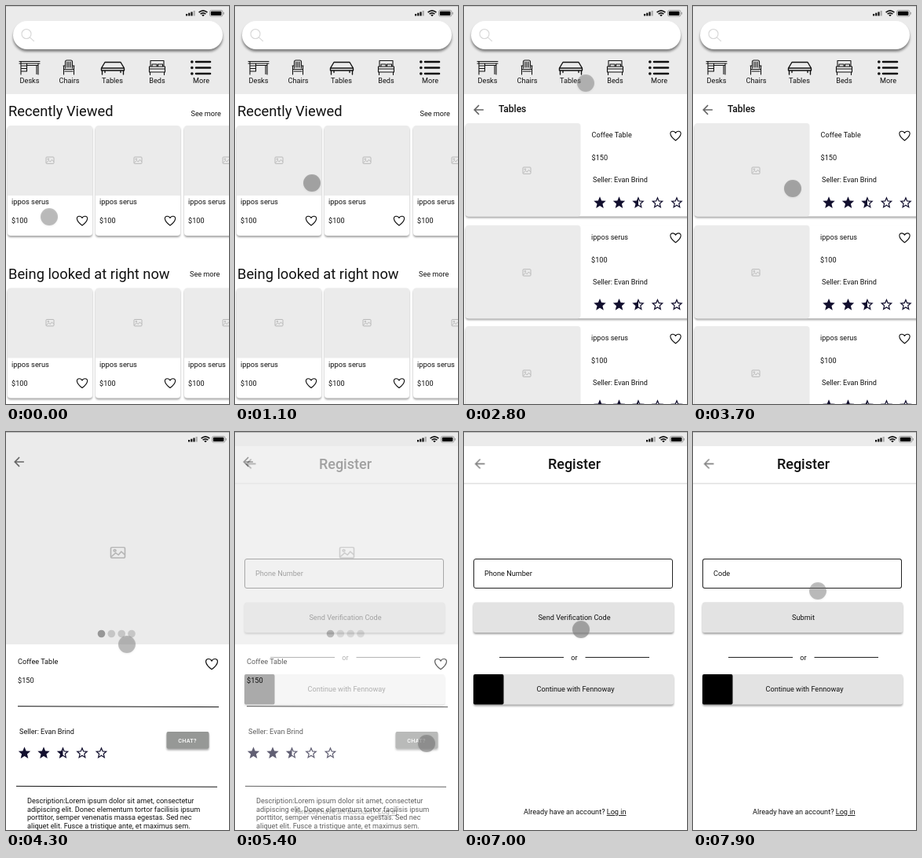
These frames come from a looping animation (284 px wide and 506 px high, 8000 ms). An HTML page:

```html
<!DOCTYPE html>
<html lang="en">
<head>
<meta charset="utf-8">
<title>Furniture app prototype</title>
<style>
html, body { margin: 0; width: 100%; height: 100%; overflow: hidden; background: #fff; }
svg { display: block; width: 284px; height: 506px; }
text { font: 9.15px Roboto, sans-serif; fill: #111; }
.h { font-size: 18.3px; }
.med { font-weight: 500; }
.mid { text-anchor: middle; }
.nav { font-size: 8.3px; }
.ln { fill: none; stroke: #111; stroke-width: 1.1; stroke-linejoin: round; stroke-linecap: round; }
.soft { filter: drop-shadow(0 2px 1.2px rgba(0,0,0,.35)); }
.deep { filter: drop-shadow(0 3px 1.5px rgba(0,0,0,.45)); }
.star { fill: #120f2e; fill-rule: evenodd; }

.layer, #arrow, #press, #cursor { animation: 8s steps(3) infinite; }
#bar { animation-name: bar; }
#tables { animation-name: tables; }
#detail { animation-name: detail; }
#register { animation-name: register; }
#code { animation-name: code; }
@keyframes bar { 0%, 15% { opacity: 0 } 18.75%, 100% { opacity: 1 } }
@keyframes tables { 0%, 31.25% { opacity: 0 } 35%, 100% { opacity: 1 } }
@keyframes detail { 0%, 47.5% { opacity: 0 } 51.25%, 100% { opacity: 1 } }
@keyframes register { 0%, 66.25% { opacity: 0 } 70%, 100% { opacity: 1 } }
@keyframes code { 0%, 91.25% { opacity: 0 } 95%, 100% { opacity: 1 } }

#arrow { animation-name: arrow; animation-timing-function: steps(9); }
@keyframes arrow { 0%, 76.25% { opacity: 1 } 87.5%, 100% { opacity: .62 } }

#press { animation-name: press; animation-timing-function: step-end; }
@keyframes press {
  0%, 23.75%, 35%, 50%, 70%, 88.75%, 95%, 100% { opacity: 0 }
  13.75%, 30%, 43.75%, 66.25%, 77.5%, 91.25% { opacity: .24 }
}

/* the pointer advances ten times a second */
#cursor { animation-name: cursor; }
@keyframes cursor {
  0% { transform: translate(55px, 268px); animation-timing-function: steps(5) }
  6.25% { transform: translate(98px, 225px) }
  18.75% { transform: translate(98px, 225px); animation-timing-function: steps(4) }
  23.75% { transform: translate(137px, 214px) }
  27.5% { transform: translate(165px, 150px); animation-timing-function: steps(2) }
  30% { transform: translate(155px, 98px) }
  36.25% { transform: translate(155px, 98px); animation-timing-function: steps(5) }
  42.5% { transform: translate(127px, 232px) }
  48.75% { transform: translate(127px, 232px); animation-timing-function: steps(4) }
  53.75% { transform: translate(154px, 270px); animation-timing-function: steps(2) }
  56.25% { transform: translate(92px, 322px); animation-timing-function: step-end }
  57.5% { transform: translate(83px, 362px); animation-timing-function: step-end }
  58.75% { transform: translate(130px, 402px); animation-timing-function: step-end }
  60% { transform: translate(200px, 409px); animation-timing-function: step-end }
  61.25% { transform: translate(244px, 396px) }
  70% { transform: translate(244px, 396px) }
  73.75% { transform: translate(200px, 340px); animation-timing-function: steps(2) }
  76.25% { transform: translate(149px, 251px) }
  96.25% { transform: translate(149px, 251px); animation-timing-function: steps(2) }
  98.75%, 100% { transform: translate(159px, 202px) }
}
</style>
</head>
<body>
<svg viewBox="0 0 284 506">
<defs>
  <g id="status">
    <path d="M229 12.5v-2.5h2.2v2.5zM232.2 12.5v-3.8h2.2v3.8zM235.4 12.5v-5h2.2v5z" fill="#111"/>
    <path d="M238.6 12.5v-6.5h2.2v6.5z" fill="#aaa"/>
    <path d="M245.6 8.2q5.4-4.6 10.8 0M247.6 10.2q3.4-2.8 6.8 0" fill="none" stroke="#111" stroke-width="1.6"/>
    <path d="M251 13.2l-1.8-1.8q1.8-1.4 3.6 0z" fill="#111"/>
    <rect x="259.5" y="5.5" width="16.5" height="7.6" rx="2" fill="none" stroke="#888" stroke-width=".8"/>
    <rect x="260.8" y="6.7" width="13.6" height="5.2" rx="1" fill="#000"/>
    <path d="M277.2 8v2.6" stroke="#888"/>
  </g>
  <path id="heart" class="ln" d="M0 6C-9-.6-7.4-5.8-3.7-5.8-1.6-5.8-.4-4.4 0-3.4.4-4.4 1.6-5.8 3.7-5.8 7.4-5.8 9-.6 0 6Z"/>
  <g id="pic" fill="none" stroke="#b4b4b4" stroke-width=".9">
    <rect x="-5" y="-4" width="10" height="8.4" rx="1"/>
    <path d="M-4.6 3.4l3-3 2 1.6 2-2.6 2.4 2.4"/><circle cx="-2.2" cy="-1.4" r=".8"/>
  </g>
  <path id="back" d="M8-1h-12.2L1.4-6.6 0-8l-8 8 8 8 1.4-1.4L-4.2 1H8z" transform="scale(.8)"/>
  <path id="full" d="M12 17.3L18.2 21l-1.7-7L22 9.2l-7.2-.6L12 2 9.2 8.6 2 9.2 7.5 14 5.8 21z"/>
  <path id="half" d="M12 17.3L18.2 21l-1.7-7L22 9.2l-7.2-.6L12 2 9.2 8.6 2 9.2 7.5 14 5.8 21zM12 15.4V6.1l1.7 4 4.4.4-3.3 2.9 1 4.3z"/>
  <path id="open" d="M12 17.3L18.2 21l-1.7-7L22 9.2l-7.2-.6L12 2 9.2 8.6 2 9.2 7.5 14 5.8 21zM12 15.4l-3.8 2.3 1-4.3-3.3-2.9 4.4-.4L12 6.1l1.7 4 4.4.4-3.3 2.9 1 4.3z"/>
  <g id="stars" class="star" transform="scale(.77) translate(-12 -12)">
    <use href="#full"/><use href="#full" x="31.8"/><use href="#half" x="63.6"/>
    <use href="#open" x="95.4"/><use href="#open" x="127.2"/>
  </g>
  <g id="card">
    <rect x="2" y="152" width="108" height="140" rx="4" fill="#fff" class="soft"/>
    <path d="M2 241v-85q0-4 4-4h100q4 0 4 4v85z" fill="#ebebeb"/>
    <use href="#pic" x="56" y="196"/>
    <text x="7" y="252.3" style="font-size:9.3px">ippos serus</text>
    <text x="7" y="276">$100</text>
    <use href="#heart" x="97" y="273"/>
  </g>
  <g id="cards"><use href="#card"/><use href="#card" x="112"/><use href="#card" x="225"/></g>
  <g id="row">
    <rect x="2" y="149" width="290" height="118.5" rx="4" fill="#fff" class="soft"/>
    <rect x="2" y="149" width="146.5" height="118.5" rx="4" fill="#ebebeb"/>
    <use href="#pic" x="80" y="209"/>
    <use href="#heart" x="269.5" y="165"/>
    <text x="164" y="224">Seller: Evan Brind</text>
    <use href="#stars" x="173" y="250"/>
  </g>
  <g id="other"><use href="#row"/><text x="162" y="167">ippos serus</text><text x="162" y="196">$100</text></g>
  <g id="head">
    <rect width="284" height="112" fill="#ebebeb"/>
    <path d="M0 .5h284" stroke="#ccc"/>
    <use href="#status"/>
    <rect x="9" y="19" width="267" height="36" rx="18" fill="#fff" class="deep"/>
    <g fill="none" stroke="#d6d6d6" stroke-width="1.1"><circle cx="26" cy="35.5" r="6"/><path d="M30.4 39.8l5.4 5"/></g>
    <g class="ln">
      <path d="M17 70.5h26M17 73h26M19 70.5v16.5M41 73v14M26.5 73v10h-7M20 76h6M20 79.5h6M26.5 75.5h14M39 75.5v11" />
      <path d="M75.5 79v-8q0-2 2-2h5q2 0 2 2v8M77.8 71v7M80 71v7M82.2 71v7M73 76h2.5M84.5 76h2.5M73.5 76v11M86.5 76v11M73.5 80.5h13M75 83h10"/>
      <path d="M126 71.5h20l4.5 7.5h-29zM121.5 79v3h29v-3M122.5 82v5M149.5 82v5M126 82v2.5M146 82v2.5" stroke-width="1.4"/>
      <path d="M184 77v-7.5h17v7.5M186 77v-3h6v3M193.500 77v-3h6v3M182.500 77h20v7h-20zM182.500 80h20M183.500 84v3.500M201.500 84v3.500"/>
      <path d="M242 71h18M242 78.500h18M242 86h18" stroke-width="2.600"/>
      <path d="M236.800 71h.1M236.800 78.500h.1M236.800 86h.1" stroke-width="3.600"/>
    </g>
    <g class="mid">
      <text x="30" y="98">Desks</text><text x="80.500" y="98">Chairs</text><text x="135.500" y="98">Tables</text>
      <text x="192.500" y="98">Beds</text><text x="248.500" y="98">More</text>
    </g>
  </g>
  <g id="arm"><path d="M-4.600-3.600L-2-8Q0-10 2-8L4-4.800M4.800-8L4.100-4.600.7-5.300"/></g>
  <rect id="btn" x="12" width="255" height="38.500" rx="3" fill="#e3e3e3"/>
  <rect id="field" x="12.500" y="161.500" width="253" height="37" rx="2.500" fill="#fff" stroke="#222"/>
</defs>

<g id="home">
  <rect width="284" height="506" fill="#fff"/>
  <use href="#head"/>
  <text class="h" x="3" y="140">Recently Viewed</text><text x="235.500" y="140">See more</text>
  <use href="#cards"/>
  <text class="h" x="3" y="347">Being looked at right now</text><text x="234" y="344">See more</text>
  <use href="#cards" y="206.500"/>
</g>

<g id="bar" class="layer">
  <rect y="466" width="284" height="40" fill="#ebebeb"/>
  <g class="ln" stroke-width="1.300">
    <path d="M15 482l10.500-9 10.500 9M17.500 480v13h5v-7h6v7h5v-13"/>
    <use href="#heart" transform="translate(103 483) scale(1.600)"/>
    <path d="M175 473h12q2 0 2 2v8q0 2-2 2h-8l-4 4v-4q-2 0-2-2v-8q0-2 2-2z"/>
    <path d="M189 476.500h2.500q2 0 2 2v8q0 2-2 2v4l-4-4h-7q-2 0-2-2"/>
    <circle cx="252" cy="483" r="10"/><circle cx="252" cy="480" r="3.800"/><path d="M245 489.500q2-4.500 7-4.500t7 4.500"/>
  </g>
  <g class="mid">
    <text class="nav" x="25" y="503.600">Home</text><text class="nav" x="103.500" y="503.600">Favourites</text>
    <text class="nav" x="183" y="503.600">Chat</text><text class="nav" x="252.500" y="503.600">Profile</text>
  </g>
  <g fill="#c6c6c6" class="soft"><circle cx="263" cy="367" r="18.500"/><circle cx="263" cy="427" r="18.500"/></g>
  <g class="ln">
    <g transform="translate(263 367)" stroke-width="1.400">
      <use href="#arm"/><use href="#arm" transform="rotate(120)"/><use href="#arm" transform="rotate(240)"/>
    </g>
    <path d="M255 421h3.500l2-3h5.500l2 3h3.500q1.500 0 1.500 1.500v10q0 1.500-1.500 1.500h-16.500q-1.500 0-1.500-1.500v-10q0-1.500 1.500-1.500z"/>
    <circle cx="263.200" cy="427" r="4"/>
  </g>
  <text x="210.500" y="369.500">Recycle</text><text x="210.500" y="429.500">Upload</text>
</g>

<g id="tables" class="layer">
  <rect width="284" height="506" fill="#fff"/>
  <use href="#head"/>
  <use href="#back" x="18.500" y="132" fill="#666"/>
  <text class="med" x="44" y="135" style="font-size:12px">Tables</text>
  <use href="#row"/><text x="162.500" y="167">Coffee Table</text><text x="162.500" y="196">$150</text>
  <use href="#other" y="129.700"/><use href="#other" y="258"/>
</g>

<g id="detail" class="layer">
  <rect width="284" height="506" fill="#fff"/>
  <rect width="284" height="270" fill="#ebebeb"/>
  <path d="M0 .5h284" stroke="#bbb"/>
  <use href="#status" x="3"/>
  <use href="#back" x="16.500" y="38" fill="#666"/>
  <use href="#pic" transform="translate(142.500 153) scale(1.800 1.600)"/>
  <g fill="#c6c6c6"><circle cx="121.500" cy="256.500" r="4.800" fill="#979797"/><circle cx="134.300" cy="256.500" r="4.800"/><circle cx="147.200" cy="256.500" r="4.800"/><circle cx="160" cy="256.500" r="4.800"/></g>
  <text x="15" y="295">Coffee Table</text><text x="15" y="318.500">$150</text>
  <use href="#heart" transform="translate(262 295) scale(1.120)"/>
  <path d="M15 348.700l256 .9M13 450.300l256 .9" stroke="#111"/>
  <text x="17" y="383.500">Seller: Evan Brind</text>
  <use href="#stars" x="23.500" y="408"/>
  <rect x="204.500" y="381" width="54" height="21.500" rx="2" fill="#969896" class="soft"/>
  <text class="mid med" x="231" y="394.700" style="font-size:7.200px;letter-spacing:.3px;fill:#fff">CHAT?</text>
  <text x="27" y="471.500">Description:Lorem ipsum dolor sit amet, consectetur</text>
  <text x="27" y="482.500">adipiscing elit. Donec elementum tortor facilisis ipsum</text>
  <text x="27" y="493.200">porttitor, semper venenatis massa egestas. Sed nec</text>
  <text x="27" y="504">aliquet elit. Fusce a tristique ante, et maximus sem.</text>
</g>

<g id="register" class="layer">
  <rect width="284" height="506" fill="#fff"/>
  <rect width="284" height="18" fill="#ebebeb"/>
  <path d="M0 .5h284" stroke="#bbb"/>
  <path d="M0 65.500h284" stroke="#e0e0e0" stroke-width="1.500"/>
  <use href="#status" x="3"/>
  <g id="arrow"><use href="#back" x="20" y="40.500" fill="#333"/></g>
  <text class="med mid" x="140.500" y="46.500" style="font-size:18px">Register</text>
  <use href="#field"/><text x="26" y="183">Phone Number</text>
  <use href="#btn" y="216.500" class="soft"/><text class="mid" x="140.500" y="239">Send Verification Code</text>
  <path d="M45 286.500h82M154.500 286.500h81.500" stroke="#222"/>
  <text class="mid" x="140.500" y="289.700">or</text>
  <use href="#btn" y="308" class="soft"/>
  <rect x="12" y="308" width="38.500" height="38.500" rx="2"/>
  <text x="92.500" y="330">Continue with Fennoway</text>
  <text x="76" y="486">Already have an account? <tspan text-decoration="underline">Log in</tspan></text>
  <g id="code" class="layer">
    <use href="#field"/><text x="26" y="183">Code</text>
    <use href="#btn" y="216.500"/><text class="mid" x="140.500" y="239">Submit</text>
  </g>
</g>

<g id="cursor">
  <circle r="11" fill="#777" fill-opacity=".45" style="filter:drop-shadow(0 1px 1px rgba(0,0,0,.15))"/>
  <circle id="press" r="11" fill="#777"/>
</g>
</svg>
</body>
</html>
```
